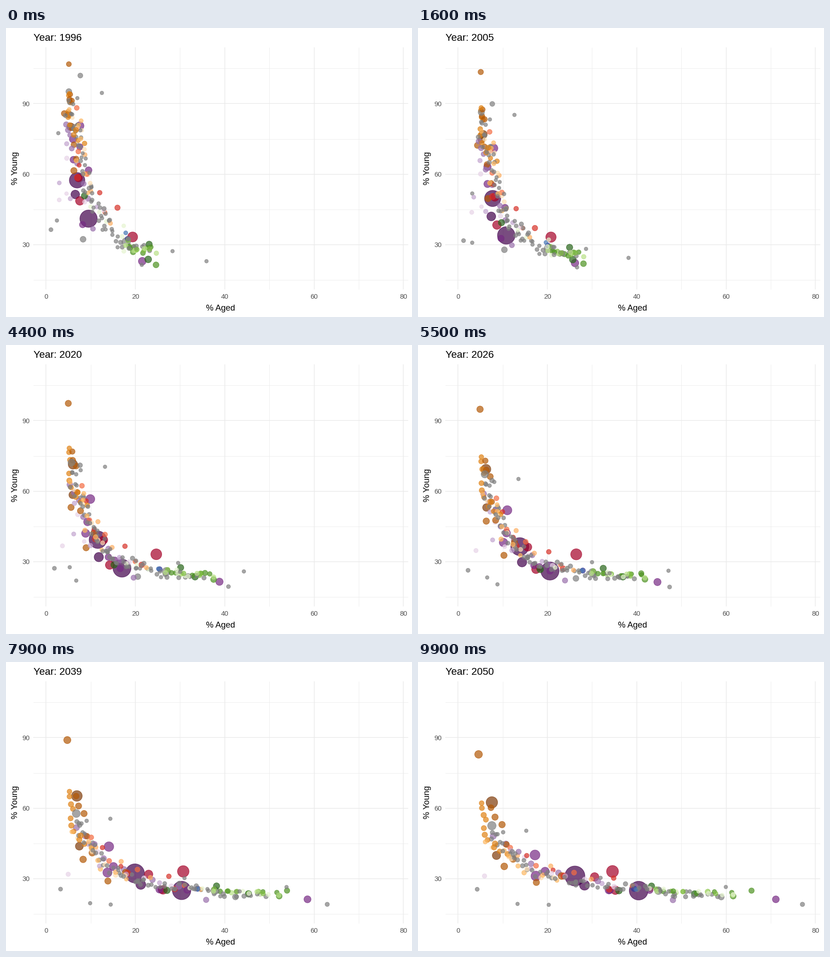
Animation of 885x632 px, one loop 10 s. Source, as a matplotlib script:

```python
import numpy as np
import matplotlib.pyplot as plt
from matplotlib.animation import FuncAnimation

W, H, DPI, FRAMES = 885, 632, 100, 100
PT = 72 / DPI

plt.rcParams["font.family"] = "Liberation Sans"
rng = np.random.default_rng(12)

PURPLE = ["#40004B", "#762A83", "#9970AB", "#C2A5CF", "#E7D4E8"]
GREEN = ["#276419", "#4D9221", "#7FBC41", "#B8E186", "#E6F5D0"]
ORANGE = ["#7F3B08", "#B35806", "#E08214", "#FDB863", "#FEE0B6"]
WARM = ["#A50026", "#D73027", "#F46D43", "#FDAE61", "#FEE090"]
BLUE = ["#313695", "#4575B4"]
GREY = "#7F7F7F"

dots_in = []


def add(color, r, grow, *ends):
    """One dot: colour, radius, growth, first x, y and last x, y."""
    dots_in.append((color, r, r * grow, *ends))


def add_band(shades, count, r, grow, first, last, noise=(7, 9)):
    """Small dots spread along one line at the start and another at the end."""
    s = (np.arange(count) + 0.5) / count

    def along(line):
        return [np.interp(s, np.linspace(0, 1, len(line)), v)
                for v in zip(*line)]

    jitter = np.clip(rng.normal(size=(count, 2)), -1.8, 1.8) * noise
    for i, (xa, ya, xb, yb) in enumerate(zip(*along(first), *along(last))):
        dx, dy = jitter[i]
        add(shades[i % len(shades)], r + rng.uniform(-0.3, 0.7), grow,
            xa + dx, ya + dy, xb + dx, yb + dy / 2)


# Large bubbles
add(PURPLE[0], 19.5, 1.08, 180, 417, 481, 500)
add(PURPLE[0], 17.5, 1.28, 155, 333, 342, 468)
add(PURPLE[0], 10, 1.15, 151, 364, 363, 488)
add(PURPLE[1], 9.5, 1.2, 161, 214, 255, 422)
add(PURPLE[1], 8.5, 1.15, 146, 243, 277, 458)
add(PURPLE[1], 8, 1.4, 147, 288, 257, 468)
add(PURPLE[1], 7.5, 1.1, 161, 260, 418, 499)
add(PURPLE[1], 8, 1.1, 180, 311, 416, 499)
add(PURPLE[1], 7.5, 1.05, 167, 430, 505, 499)
add(PURPLE[1], 9, 0.9, 297, 510, 780, 519)
add(WARM[0], 11.5, 1.18, 276, 457, 424, 458)
add(WARM[0], 10, 1, 161, 378, 430, 499)
add(WARM[0], 9, 1.1, 158, 328, 385, 470)
add(WARM[1], 7.5, 1, 156, 327, 318, 468)
add(WARM[1], 6.5, 1.1, 243, 393, 417, 497)
add(ORANGE[0], 9, 1.45, 141, 216, 161, 307)
add(ORANGE[0], 8, 1.2, 137, 189, 171, 423)
add(ORANGE[1], 6, 1.5, 137, 79, 132, 202)
add(ORANGE[1], 7, 1.15, 127, 187, 188, 447)
add(ORANGE[1], 7.5, 1, 148, 312, 258, 482)
add(ORANGE[1], 6.5, 1.25, 153, 286, 313, 468)
add(GREEN[0], 7.5, 1.05, 171, 367, 438, 500)
add(GREEN[0], 8, 0.95, 310, 506, 603, 507)
add(GREEN[0], 7.5, 1, 312, 473, 509, 490)
add(GREEN[1], 7, 1, 327, 518, 687, 512)
add(GREEN[1], 6.5, 1, 277, 490, 727, 500)
add(BLUE[0], 6, 1.1, 265, 461, 471, 496)
add(BLUE[1], 5, 1, 261, 448, 475, 497)
add(GREY, 7, 1.4, 137, 139, 161, 358)
add(GREY, 10, 0.9, 262, 468, 524, 500)
add(GREY, 7, 1, 168, 462, 661, 514)

# Small dots far from the crowd
add(PURPLE[4], 5, 1.1, 116, 376, 145, 468)
add(GREY, 4.5, 1, 209, 142, 236, 369)
add(GREY, 5, 1, 98, 441, 129, 497)
add(GREY, 4.5, 1, 111, 421, 285, 531)
add(GREY, 4.5, 1, 114, 230, 217, 529)
add(GREY, 4.5, 1, 437, 510, 671, 492)
add(GREY, 4.5, 1.2, 296, 518, 838, 530)
add(GREY, 4.5, 1, 363, 488, 398, 472)
add(GREY, 6, 0.9, 162, 104, 160, 387)

# The crowd
add_band([GREY], 68, 4.6, 1.05,
         [(138, 150), (158, 255), (185, 375), (228, 450), (305, 492)],
         [(160, 365), (235, 455), (370, 488), (520, 500), (650, 515)],
         (9, 10))
add_band(ORANGE[2:3], 11, 5.6, 1.08,
         [(145, 125), (135, 195), (165, 260)],
         [(145, 295), (145, 378), (190, 425)], (5, 8))
add_band(ORANGE[1:2], 5, 6.3, 1.15,
         [(137, 141), (140, 170), (153, 290)],
         [(151, 309), (180, 361), (217, 455)], (4, 6))
add_band(ORANGE[3:], 13, 4.8, 1.05,
         [(150, 175), (155, 240), (190, 380)],
         [(155, 390), (210, 445), (320, 485)])
add_band(PURPLE[2:3], 8, 6, 1.12,
         [(131, 195), (145, 270), (198, 452)],
         [(152, 367), (260, 450), (600, 525)], (4, 6))
add_band(PURPLE[3:], 8, 4.9, 1.1,
         [(135, 255), (125, 370), (240, 392)],
         [(190, 415), (300, 465), (460, 490)])
add_band(WARM[2:4] + WARM[1:2], 11, 5.4, 1.02,
         [(152, 180), (165, 300), (225, 440)],
         [(190, 410), (300, 455), (520, 502)])
add_band(GREEN[2:4] + GREEN[1:2], 15, 5.5, 1,
         [(255, 460), (291, 492), (327, 480)],
         [(505, 495), (590, 505), (700, 505)], (8, 9))
add_band(GREEN[4:], 7, 4.7, 1,
         [(185, 370), (245, 440), (264, 498)],
         [(500, 487), (600, 505), (707, 510)])

# Bigger bubbles lie mostly below smaller ones
dots_in.sort(key=lambda d: -d[1] + rng.normal(0, 1.2))
colors = [d[0] for d in dots_in]
r0, r1, xa, ya, xb, yb = np.array([d[1:] for d in dots_in], float).T

# Births fall early and level off; ageing picks up later.
x_pow = np.interp(xa, [200, 270], [1.75, 1.3])
y_pow = np.interp(yb, [200, 420, 470, 500], [0.85, 1.5, 2, 3.3])


def positions(t):
    x = xa + (xb - xa) * t ** x_pow
    y = yb + (ya - yb) * (1 - t) ** y_pow
    return np.column_stack([x, y])


def sizes(t):
    r = r0 + (r1 - r0) * t
    return ((2 * r - 1) * PT) ** 2


def px(v):
    return 87.3 + 9.739 * v


def py(v):
    return 473.7 - 5.137 * (v - 30)


fig = plt.figure(figsize=(W / DPI, H / DPI), dpi=DPI, facecolor="white")
ax = fig.add_axes([0, 0, 1, 1])
ax.set(xlim=(0, W), ylim=(H, 0))
ax.axis("off")

for xs, ys, lw in [((10, 30, 50, 70), (15, 45, 75, 105), 0.9),
                   ((0, 20, 40, 60, 80), (30, 60, 90), 1.5)]:
    style = dict(color="#EBEBEB", lw=lw * PT, zorder=1)
    for v in xs:
        ax.plot([px(v)] * 2, [42.5, 571], **style)
    for v in ys:
        ax.plot([60, 875.5], [py(v)] * 2, **style)


def label(x, y, s, size, color="black", **kw):
    return ax.text(x, y, s, fontsize=size * PT, color=color, **kw)


for v in (0, 20, 40, 60, 80):
    label(px(v), 592, str(v), 14.67, "#4D4D4D", ha="center")
for v in (30, 60, 90):
    label(51.5, py(v) + 5.5, str(v), 14.67, "#4D4D4D", ha="right")
label(467.5, 618, "% Aged", 18.33, ha="center")
label(25, 307, "% Young", 18.33, ha="center", va="center", rotation=90,
      rotation_mode="anchor").set(va="baseline")
title = label(60, 28, "Year: 1996", 22)

dots = ax.scatter(*positions(0).T, s=sizes(0), c=colors, alpha=0.7,
                  edgecolors=colors, linewidths=PT, zorder=2)


def draw(frame):
    t = frame / (FRAMES - 1)
    title.set_text(f"Year: {round(1996 + 54 * t)}")
    dots.set_offsets(positions(t))
    dots.set_sizes(sizes(t))
    return title, dots


anim = FuncAnimation(fig, draw, frames=FRAMES, interval=100, repeat=True,
                     repeat_delay=0)
plt.show()
```
